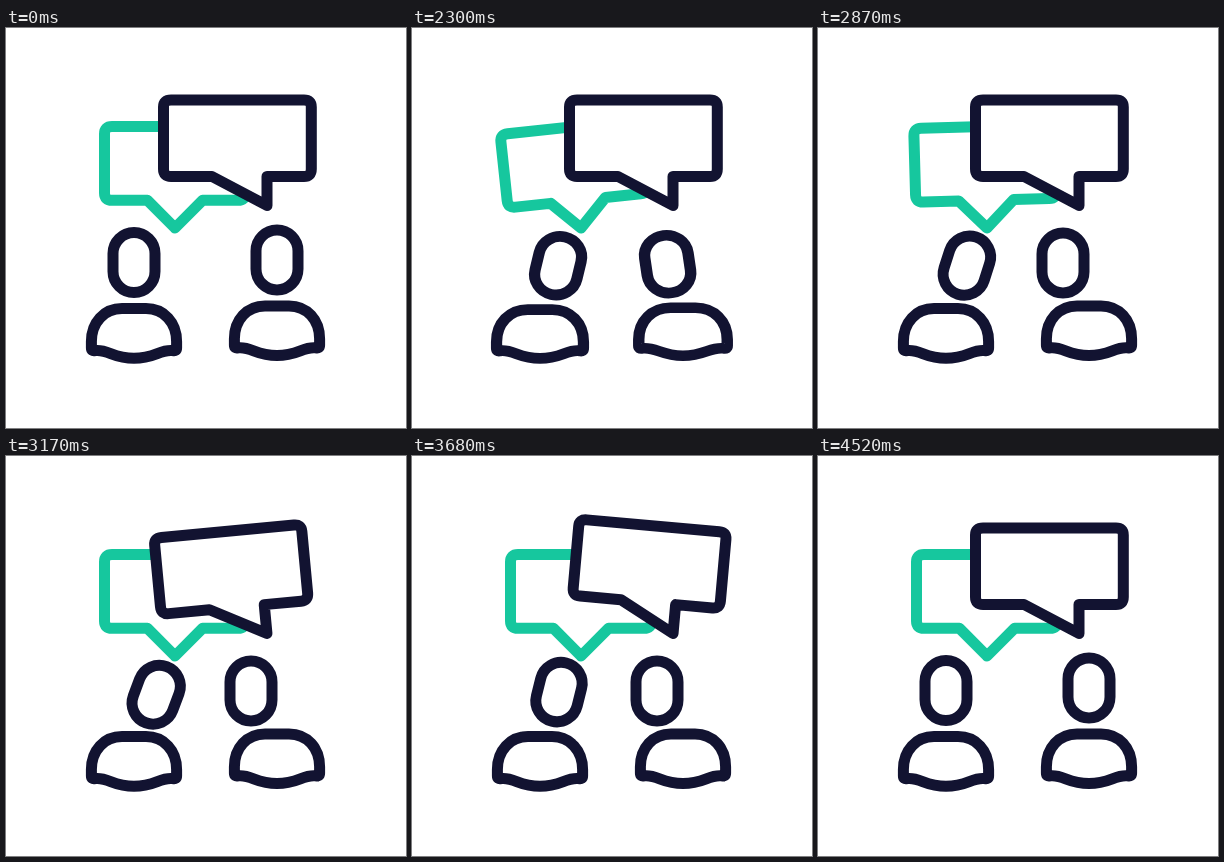
Animation of 400 by 400 pixels, one loop 4550 ms. Source, as an HTML page:

```html
<!DOCTYPE html>
<html lang="en">
<head>
<meta charset="utf-8">
<title>Conversation</title>
<style>
  html, body { margin: 0; width: 100%; height: 100%; overflow: hidden; background: #fff; }
  svg { display: block; width: 100vw; height: 100vh; }
  .line { fill: none; stroke: #121331; stroke-width: 11; stroke-linecap: round; stroke-linejoin: round; }
  #reply { stroke: #16c79e; }
  #speech { fill: #fff; }
</style>
</head>
<body>
<svg viewBox="0 0 400 400">
  <defs>
    <rect id="head" x="107" y="204.6" width="42" height="60" rx="21"/>
    <path id="body" d="M85.4 320V313.5C85.4 294.5 98 280.6 116 280.6H140C158 280.6 170.6 294.5 170.6 313.5V320Q170.6 323.4 167 322.6C154 321 149 330.3 128 330.3C107 330.3 102 321 89 322.6Q85.4 323.4 85.4 320Z"/>
  </defs>
  <path id="reply" class="line" d="M106 98.5H232Q239.5 98.5 239.5 106V165Q239.5 172.3 232 172.3H196.5L169 200L141.5 172.3H106Q98.5 172.3 98.5 165V106Q98.5 98.5 106 98.5Z"/>
  <path id="speech" class="line" d="M165 72H298Q305.3 72 305.3 79V141Q305.3 148.5 298 148.5H261V177.5L206 148.5H165Q157.5 148.5 157.5 141V79Q157.5 72 165 72Z"/>
  <g id="left" class="line"><use href="#body"/><use class="face" href="#head"/></g>
  <g id="right" class="line"><use href="#body"/><use class="face" href="#head"/></g>
</svg>
<script>
const LOOP = 4550, START = 2000, STEP = 30;
const TURN = 12;    // steps a person takes to turn
const ANSWER = 37;  // steps from the first bubble to the second
const $ = s => document.querySelector(s);

const phase = (f, start, length) => Math.min(1, Math.max(0, (f - start) / length));
const ease = (f, start, length) => (1 - Math.cos(Math.PI * phase(f, start, length))) / 2;
const bump = (f, start, length) => Math.sin(Math.PI * phase(f, start, length));

// Each swing of a bubble goes to the other side and is smaller than the last.
function wobble(f) {
  const swing = i => i < 0 || i > 3 ? 0 : (i % 2 ? 1 : -1) * (21.5 - 5.7 * i);
  const end = i => i < 0 ? 0 : Math.min(6 + 9 * i, 39);
  let angle = 0;
  for (let i = 0; i <= 4; i++) {
    angle += (swing(i) - swing(i - 1)) * ease(f, end(i - 1), end(i) - end(i - 1));
  }
  return angle;
}

// x, y and tilt hold while turned; nod adds degrees, drift moves the head with it.
const people = [
  {
    el: $('#left'), home: [0, 0], turn: 0, back: 68, x: 19, y: 1.5, tilt: 14,
    nod: f => 7.5 * Math.sin(2 * Math.PI * phase(f, 17, 32)) ** 2, drift: [0.5, 0.4]
  },
  {
    el: $('#right'), home: [143, -2.7], turn: 3, back: 59, x: -26, y: 3, tilt: 0,
    nod: f => -12.5 * (ease(f, 3, TURN) - ease(f, 18, 10)), drift: [-0.2, 0.13]
  }
];

function pose(p, f) {
  const turned = ease(f, p.turn, TURN) - ease(f, p.back, TURN);
  const squash = bump(f, p.turn, TURN) + bump(f, p.back, TURN);
  const nod = p.nod(f);
  const x = p.x * turned + p.drift[0] * nod;
  const y = p.y * turned + p.drift[1] * nod;
  p.el.setAttribute('transform',
    `translate(${p.home[0] + 128} ${p.home[1] + 335}) scale(${1 + 0.04 * squash} ${1 - 0.035 * squash}) translate(-128 -335)`);
  p.el.querySelector('.face').setAttribute('transform',
    `translate(${x} ${y}) rotate(${p.tilt * turned + nod} 128 234.6)`);
}

function draw(ms) {
  const f = Math.floor((ms % LOOP - START) / STEP);
  $('#reply').setAttribute('transform', `rotate(${wobble(f)} 169 200)`);
  $('#speech').setAttribute('transform', `rotate(${wobble(f - ANSWER)} 261 178)`);
  people.forEach(p => pose(p, f));
}

const t0 = performance.now();
function tick() {
  draw(performance.now() - t0);
  requestAnimationFrame(tick);
}
tick();
</script>
</body>
</html>
```
